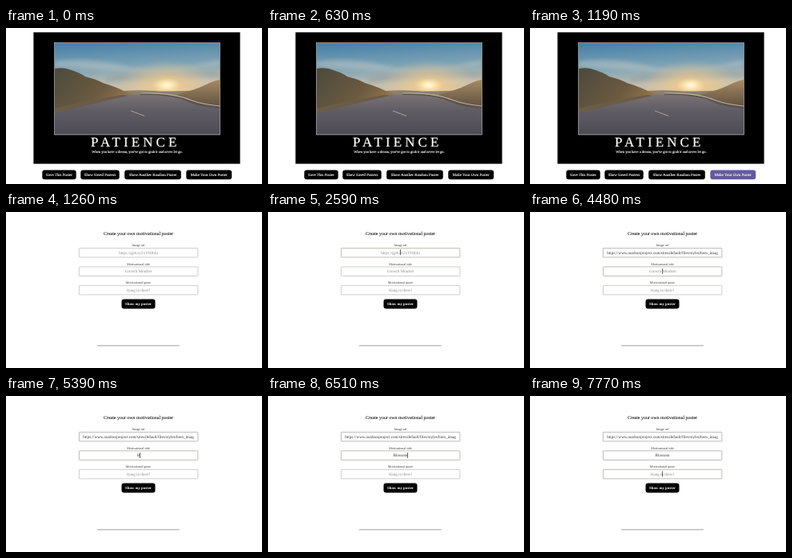
Recreate the animation shown at these times as an HTML page. Size 320 by 196 pixels, loop 8000 ms.

```html
<!DOCTYPE html>
<html lang="en">
<head>
<meta charset="utf-8">
<title>Motivational posters</title>
<style>
  html, body { margin: 0; width: 100%; height: 100%; overflow: hidden; background: #fff; }
  svg { display: block; width: 100vw; height: 100vh; }
  text {
    font-family: "Liberation Serif", serif;
    font-size: 5.1px;
    text-anchor: middle;
    text-rendering: geometricPrecision;
    white-space: pre;
  }
  #poster text { fill: #fff; stroke: #fff; stroke-width: .12; }
  #poster .title { font-size: 17px; letter-spacing: 4.1px; stroke-width: .2; }
  .quote { font-size: 4.53px; }
  .buttons text { font-size: 4.9px; }
  .heading { font-size: 5.95px; fill: #111; stroke: #111; stroke-width: .08; }
  .label { font-size: 4.1px; fill: #333; }
  .field rect { fill: #fff; stroke: #b8b8b8; stroke-width: .7; }
  .field text { fill: #333; }
  .field.filled rect { stroke: #9c9c9c; }
  .field.focus rect { stroke: #a5a296; }
  .field.empty text { fill: #8a8a8a; }
  .show { font-size: 4.8px; font-weight: bold; fill: #fff; }
  #hover { animation: hover 8s step-end infinite; }
  @keyframes hover {
    0% { fill: #000; }
    9.625% { fill: #221e36; }
    10.5% { fill: #443c6d; }
    11.375%, 100% { fill: #6359a0; }
  }
  #poster { animation: poster 8s step-end infinite; }
  #form { animation: form 8s step-end infinite; }
  @keyframes poster { 0% { visibility: visible; } 15.75%, 100% { visibility: hidden; } }
  @keyframes form { 0% { visibility: hidden; } 15.75%, 100% { visibility: visible; } }
</style>
</head>
<body>
<svg viewBox="0 0 320 196" preserveAspectRatio="none">
  <defs>
    <linearGradient id="sky" x1="0" y1="0" x2=".15" y2="1">
      <stop offset="0" stop-color="#447fa6"/>
      <stop offset=".45" stop-color="#7fa3b5"/>
      <stop offset=".75" stop-color="#c3bfae"/>
      <stop offset="1" stop-color="#e0c08f"/>
    </linearGradient>
    <radialGradient id="glow">
      <stop offset="0" stop-color="#fffdf0"/>
      <stop offset=".1" stop-color="#ffedb4"/>
      <stop offset=".3" stop-color="#f6cd8a" stop-opacity=".65"/>
      <stop offset="1" stop-color="#f0cf9c" stop-opacity="0"/>
    </radialGradient>
    <linearGradient id="hill" x1="0" y1="0" x2="1" y2=".5">
      <stop offset="0" stop-color="#4b4a3d"/>
      <stop offset=".6" stop-color="#6b5a40"/>
      <stop offset="1" stop-color="#9c7c54"/>
    </linearGradient>
    <linearGradient id="slope" x1="0" y1="0" x2="0" y2="1">
      <stop offset="0" stop-color="#a58a66"/>
      <stop offset="1" stop-color="#5c4e3c"/>
    </linearGradient>
    <linearGradient id="road" x1="0" y1="0" x2="0" y2="1">
      <stop offset="0" stop-color="#7b7374"/>
      <stop offset=".4" stop-color="#5f5c64"/>
      <stop offset="1" stop-color="#4c4b54"/>
    </linearGradient>
    <filter id="soft"><feGaussianBlur stdDeviation="2.5"/></filter>
    <clipPath id="photo"><rect x="61" y="19" width="206" height="115"/></clipPath>
    <clipPath id="urlBox"><rect x="95.5" y="46" width="139.5" height="11"/></clipPath>
  </defs>

  <g id="poster">
    <rect x="34.4" y="5.4" width="258.2" height="165.2"/>
    <g clip-path="url(#photo)">
      <rect x="61" y="19" width="206" height="75" fill="url(#sky)"/>
      <g filter="url(#soft)" opacity=".4">
        <path d="M61 42Q105 36 150 48T267 40V46Q210 54 165 54T61 48Z" fill="#cfd0c8"/>
        <path d="M125 62Q170 52 267 56V62Q190 62 125 68Z" fill="#8d9498"/>
      </g>
      <ellipse cx="201" cy="72" rx="60" ry="32" fill="url(#glow)"/>
      <path d="M135 80Q160 77 185 79T267 76V95H135Z" fill="#8b8070"/>
      <path d="M212 84Q236 78 248 72T267 65V101H235Z" fill="url(#slope)"/>
      <path d="M61 51Q73 49 82 53Q92 56 99 61Q112 64 121 69Q138 74 151 81L168 85L61 112Z" fill="url(#hill)"/>
      <path d="M61 106Q105 93 138 86Q170 81 205 86Q225 91 239 97L267 101V134H61Z" fill="url(#road)"/>
      <path d="M61 101Q100 91 146 84L153 85Q105 96 61 107Z" fill="#6b5c47"/>
      <g fill="none">
        <path d="M168 83Q208 82 232 93Q246 98 267 100" stroke="#5a5350" stroke-width="2.4"/>
        <path d="M168 82Q208 81 232 91Q246 96 267 98" stroke="#b9b0a4" stroke-width="1.2"/>
        <path d="M156 104L173 110.5" stroke="#c0b7a8" stroke-width=".8"/>
      </g>
    </g>
    <rect x="60.5" y="18.5" width="207" height="115.5" fill="none" stroke="#c5c5c5" stroke-width=".7"/>
    <text class="title" x="161.8" y="148.6">PATIENCE</text>
    <text class="quote" x="164" y="156.8">When you have a dream, you've got to grab it and never let go.</text>
    <g class="buttons">
      <rect x="45.3" y="178.4" width="42.4" height="11.8" rx="3"/>
      <rect x="93.3" y="178.4" width="48.4" height="11.8" rx="3"/>
      <rect x="148.2" y="178.4" width="70.6" height="11.8" rx="3"/>
      <rect id="hover" x="225.3" y="178.4" width="56.9" height="11.8" rx="3"/>
      <text x="66.5" y="185.8">Save This Poster</text>
      <text x="117.5" y="185.8">Show Saved Posters</text>
      <text x="183.5" y="185.8">Show Another Random Poster</text>
      <text x="253.7" y="185.8">Make Your Own Poster</text>
    </g>
  </g>

  <g id="form">
    <text class="heading" x="165.5" y="28.9">Create your own motivational poster</text>
    <text class="label" x="165.5" y="43">Image url</text>
    <text class="label" x="165.5" y="66.5">Motivational title</text>
    <text class="label" x="165.5" y="90">Motivational quote</text>
    <g class="field">
      <rect x="91.4" y="45.4" width="148.5" height="11.5" rx=".6"/>
      <g clip-path="url(#urlBox)"><text x="165.5" y="52.6"></text></g>
    </g>
    <g class="field">
      <rect x="91.4" y="68.9" width="148.5" height="11.5" rx=".6"/>
      <text x="165.5" y="76.3"></text>
    </g>
    <g class="field">
      <rect x="91.4" y="92.4" width="148.5" height="11.5" rx=".6"/>
      <text x="165.5" y="99.8"></text>
    </g>
    <rect id="caret" y="0" width=".6" height="7"/>
    <rect x="144.5" y="109.6" width="42" height="11.9" rx="3"/>
    <text class="show" x="165.5" y="117.2">Show my poster</text>
    <rect x="113.8" y="167.5" width="103" height=".8" fill="#858585"/>
  </g>
</svg>
<script>
  const LOOP = 8000, CENTER = 165.5, LEFT = 96.3, RIGHT = 234;
  const URL_TEXT = "https://www.outdoorproject.com/sites/default/files/styles/" +
    "hero_image_desktop/public/features/dkf2196-2.jpg?itok=rgKit9%2B";
  const TITLE = "Blossom";
  const placeholders = ["https://gph.is/2xYHR4a", "Growth Mindset", "Hang in there!"];
  const focusTimes = [2450, 4480, 6720];
  const pasteTime = 3640;
  const keyTimes = [5390, 5530, 5740, 6160, 6300, 6440, 6510];
  const caretOff = [[3010, 3500], [4130, 4480], [5040, 5390], [7210, 7770]];
  const caretTops = [47, 71, 94.5];

  const fields = [...document.querySelectorAll(".field")];
  const caret = document.getElementById("caret");
  const countPassed = (times, t) => times.filter(time => t >= time).length;

  function drawField(field, i, value, focused) {
    const text = field.querySelector("text");
    field.classList.toggle("empty", !value);
    field.classList.toggle("filled", !!value);
    field.classList.toggle("focus", focused);
    const content = value || placeholders[i];
    if (text.textContent !== content) text.textContent = content;

    // Long values scroll to their end while being edited.
    const overflows = value === URL_TEXT;
    const anchor = !overflows ? "middle" : focused ? "end" : "start";
    const x = !overflows ? CENTER : focused ? RIGHT - .4 : LEFT;
    text.style.textAnchor = anchor;
    text.setAttribute("x", x);

    if (focused) {
      const end = !value ? CENTER - .3 : overflows ? RIGHT : CENTER + text.getComputedTextLength() / 2;
      caret.setAttribute("x", end);
      caret.setAttribute("y", caretTops[i]);
    }
  }

  function draw(t) {
    const focus = countPassed(focusTimes, t) - 1;
    const values = [t >= pasteTime ? URL_TEXT : "", TITLE.slice(0, countPassed(keyTimes, t)), ""];
    fields.forEach((field, i) => drawField(field, i, values[i], i === focus));
    const hidden = focus < 0 || caretOff.some(([from, to]) => t >= from && t < to);
    caret.style.display = hidden ? "none" : "";
  }

  const start = performance.now();
  function tick() {
    draw((performance.now() - start) % LOOP);
    requestAnimationFrame(tick);
  }
  tick();
</script>
</body>
</html>
```
